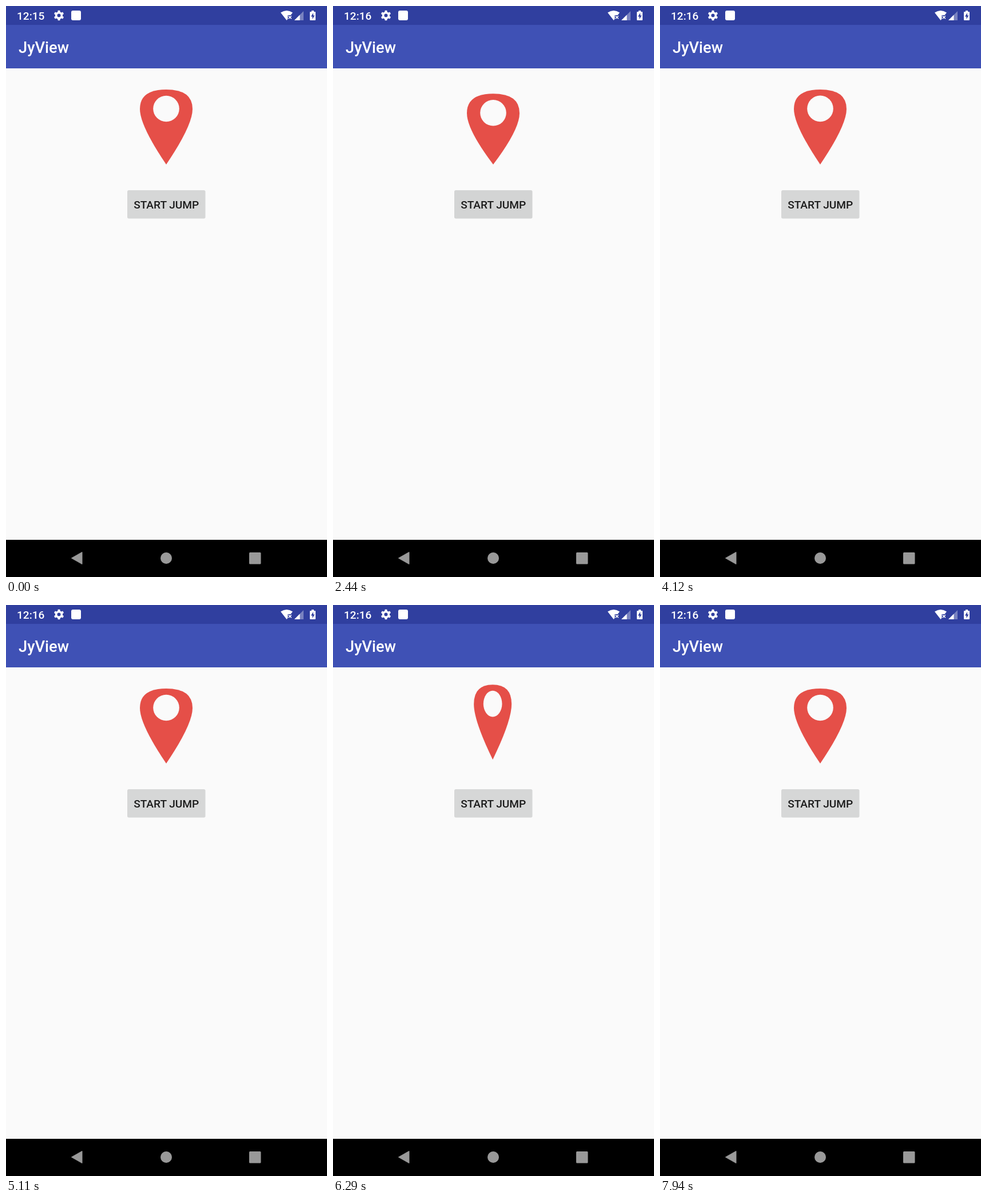
These frames come from a looping animation (561 px wide and 998 px high, 8410 ms). An HTML page:

```html
<!DOCTYPE html>
<html lang="en">
<head>
<meta charset="utf-8">
<title>Jumping pin</title>
<style>
  html, body { margin: 0; width: 100%; height: 100%; overflow: hidden; background: #fafafa; }
  svg { display: block; width: 561px; height: 998px; }
  text { font-family: Roboto, sans-serif; font-weight: 500; }
</style>
</head>
<body>
<svg viewBox="0 0 561 998">
  <rect width="561" height="998" fill="#fafafa"/>
  <rect width="561" height="33" fill="#303f9f"/>
  <rect y="33" width="561" height="76" fill="#3f51b5"/>
  <rect y="933" width="561" height="65"/>

  <g fill="#fff">
    <text id="clock" x="19" y="24" font-size="19.1">12:15</text>
    <text x="22" y="81.5" font-size="27.3">JyView</text>
    <!-- gear -->
    <g transform="translate(92.5 16.5)">
      <circle r="4.8" fill="none" stroke="#fff" stroke-width="3.6"/>
      <g id="teeth"></g>
    </g>
    <rect x="114" y="8" width="17" height="17" rx="3"/>
    <!-- wifi, signal, battery -->
    <path d="M480 11.5Q490.5 4.5 501 11.5L497.5 16H492.5V22.5L490.5 25Z"/>
    <path d="M493.8 17.3l5 5m0-5l-5 5" stroke="#fff" stroke-width="1.6"/>
    <path d="M504 25L520 9V25Z" opacity=".35"/>
    <path d="M504 25L513.5 15.5V25Z"/>
    <path d="M534 8h4v2h2q1 0 1 1v13q0 1-1 1h-8q-1 0-1-1v-13q0-1 1-1h2Z"/>
    <path d="M537 12l-4 6.5h2.5v4.5l4-6.500h-2.5Z" fill="#303f9f"/>
  </g>

  <g fill="#999">
    <path d="M114.500 965L133 954.500V975.500Z" stroke="#999" stroke-linejoin="round"/>
    <circle cx="280" cy="965" r="10"/>
    <rect x="425" y="955" width="20.500" height="20.500" rx="1.500"/>
  </g>

  <rect id="button" x="212" y="322" width="136.500" height="49.500" rx="2.700"/>
  <text x="280.200" y="354" font-size="19.100" text-anchor="middle" fill="#1b1b1b">START JUMP</text>

  <g id="pin">
    <path id="body" fill="#e54f48"/>
    <circle id="hole" cx="280" r="22.800" fill="#fafafa"/>
  </g>
  <circle id="touch" r="15" fill="#fafafa" fill-opacity=".65" stroke="#bcc3e4" stroke-width="2"/>
</svg>
<script>
const LOOP = 8410, STEP = 300, PRESS_LEAD = 50;
const JUMPS = [1950, 3510, 5190, 6740];
const PIVOT = 277;
const el = id => document.getElementById(id);
const set = (id, attrs) => {
  for (const name in attrs) el(id).setAttribute(name, attrs[name]);
};
const clamp = v => Math.max(0, Math.min(1, v));
const ramp = (t, from, to) => clamp((t - from) / (to - from));

el('teeth').innerHTML = [0, 60, 120, 180, 240, 300].map(a =>
  `<rect x="-2" y="-8.800" width="4" height="4" rx=".8" transform="rotate(${a})"/>`).join('');

function drawPin(t) {
  const start = JUMPS.find(s => t >= s && t < s + 4 * STEP);
  const phase = start === undefined ? 0 : (t - start) / STEP;
  // Two steps squash and release, two steps rise and fall.
  const wave = (1 - Math.cos(Math.PI * phase)) / 2;
  const squash = phase < 2 ? 25 * wave : 0;
  const lift = phase < 2 ? 0 : wave;
  const top = 146 + squash, side = top + 34;
  set('body', {
    d: `M280 ${top}Q234 ${top} 234 ${side}Q234 ${side + 29} 280 277` +
       `Q326 ${side + 29} 326 ${side}Q326 ${top} 280 ${top}Z`
  });
  set('hole', { cy: top + 33.5 });
  const turn = Math.cos(Math.PI * lift);
  set('pin', {
    transform: `translate(${PIVOT} ${-28 * lift}) scale(${turn} 1) translate(${-PIVOT} 0)`
  });
}

function drawButton(t) {
  const press = JUMPS.map(s => t - s + PRESS_LEAD)
    .reduce((sum, p) => sum + ramp(p, 0, 120) * (1 - ramp(p, 340, 580)), 0);
  const shade = v => Math.round(v - 18 * press);
  set('button', { fill: `rgb(${shade(214)},${shade(215)},${shade(215)})` });
}

function drawTouch(t) {
  const move = ramp(t, 1730, 1900);
  set('touch', {
    cx: 233 + 12 * move,
    cy: 327 + 8 * move,
    opacity: ramp(t, 1600, 1700) * (1 - ramp(t, 1850, 1960))
  });
}

function frame(now) {
  const t = now % LOOP;
  el('clock').textContent = t < 480 ? '12:15' : '12:16';
  drawPin(t);
  drawButton(t);
  drawTouch(t);
}

const origin = performance.now();
function tick() {
  frame(performance.now() - origin);
  requestAnimationFrame(tick);
}
tick();
</script>
</body>
</html>
```
